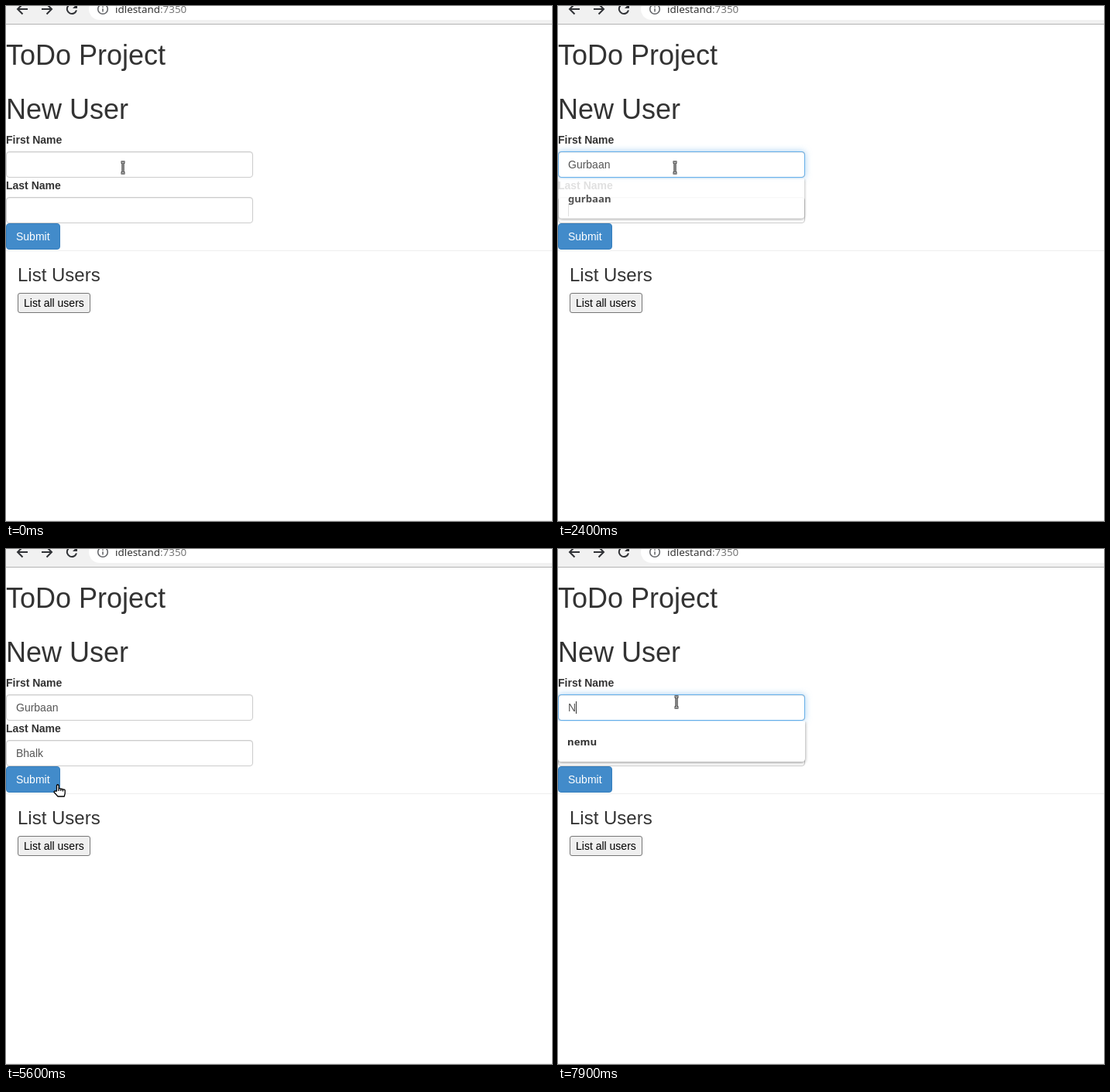
Animation of 705x666 px, one loop 8 s. Source, as an HTML page:

```html
<!DOCTYPE html>
<html lang="en">
<head>
<meta charset="utf-8">
<title>User form</title>
<style>
html, body { margin: 0; width: 100%; height: 100%; overflow: hidden; background: #fff; }
body { position: relative; font: 14px/20px "Liberation Sans", Arial, sans-serif; color: #333; }
body > * { position: absolute; box-sizing: border-box; white-space: pre; margin: 0; }
h1, h3 { font-weight: 500; line-height: 1.1; }
h1 { font-size: 36px; left: 0; }
h3 { font-size: 24px; left: 15px; top: 335px; }
label { left: 0; font-weight: bold; }
svg { left: 0; top: 0; overflow: visible; }
.bar { left: 0; top: 0; width: 100%; height: 24px; background: #f1f1f1; border-bottom: 1px solid #b4b4b4; overflow: hidden; }
.pill { position: absolute; left: 107px; right: -30px; top: -10px; height: 28px; border-radius: 14px; background: #fff; }
.url { left: 141px; top: -6px; font: 13.4px/20px "Noto Sans", "Open Sans", sans-serif; }
.url i { font-style: normal; color: #757575; }
.field { left: 0; width: 319px; height: 34px; padding: 6px 12px; border: 1px solid #ccc; border-radius: 4px; color: #555; background: #fff; }
.field::before { content: ""; position: absolute; inset: -1px; border: 1px solid #66afe9; border-radius: 4px;
  box-shadow: 0 0 8px rgba(102,175,233,.6); opacity: var(--glow); }
.field::after { content: ""; position: absolute; inset: 0; border-radius: 3px; box-shadow: inset 0 1px 1px rgba(0,0,0,.075); }
.caret { position: absolute; top: 8px; width: 1px; height: 16px; background: #333; }
#submit { left: 0; top: 281px; width: 70px; height: 34px; padding: 6px 12px; color: #fff; background: #428bca; border: 1px solid #357ebd; border-radius: 4px; }
#submit.dark { background: #3276b1; border-color: #285e8e; }
#submit.ring { box-shadow: inset 0 0 0 1px #fff, inset 0 0 0 3px #101010; }
.all { left: 15px; top: 371px; width: 94px; height: 26px; padding: 2px 7px; color: #000; background: #efefef; border: 1px solid #767676; border-radius: 3px; }
.rule { left: 0; width: 100%; height: 1px; background: #eee; }
#menu { left: 0; width: 319px; padding: 8px 12px; background: #fff; border-radius: 0 0 4px 4px; box-shadow: 0 1px 4px rgba(0,0,0,.45);
  clip-path: inset(0 -8px -8px -8px); font: 600 13.2px/36px "Noto Sans", "Open Sans", sans-serif; }
</style>
</head>
<body>
<div class="bar"><div class="pill"></div></div>
<svg width="140" height="24" fill="none" stroke="#303236" stroke-width="2">
  <path d="M28 4H15M21.5-2.5 15 4l6.5 6.5M46 4h13M52.500-2.500 59 4l-6.500 6.500"/>
  <path d="M89.500-.5A6.200 6.200 0 1 0 91 5.500"/>
  <path d="M92-3V3H86z" fill="#303236" stroke="none"/>
  <g stroke="#606266" stroke-width="1.500"><circle cx="125" cy="4" r="6.300"/><path d="M125 3.200V7.500M125 .4V1.900"/></g>
</svg>
<div class="url">idlestand<i>:7350</i></div>
<h1 style="top:44px">ToDo Project</h1>
<h1 style="top:113.600px">New User</h1>
<label style="top:163px">First Name</label>
<div class="field" style="top:188px"></div>
<label style="top:222px">Last Name</label>
<div class="field" style="top:247px"></div>
<div id="submit">Submit</div>
<div class="rule" style="top:316px"></div>
<h3>List Users</h3>
<div class="all">List all users</div>
<div class="rule" style="top:665px"></div>
<div id="menu"></div>
<svg id="cursor" width="1" height="1" stroke-linejoin="round"></svg>
<script>
const LOOP = 8000;
const FIRST = "Gurbaan", LAST = "Bhalk", OTHER = "nemu";
const first = FIRST.toLowerCase(), last = LAST.toLowerCase();

const CURSORS = {
  beam: '<g fill="none"><path d="M-2.5-7H2.500M0-7V7M-2.500 7H2.500" stroke="#000" stroke-width="3"/>' +
        '<path d="M-2.500-7H2.500M0-7V7M-2.500 7H2.500" stroke="#fff"/></g>',
  hand: '<path d="M4.500 9V1.700q1.300-1.900 2.600 0V6q1.500-1 2.700.5 1.500-.8 2.600.6 1.700-.5 2.800.9V12l-1 4H6L1 10.500q0-2 2-1.300zM7.100 6V9M9.800 6.500V9M12.400 7.100V9.500" fill="#fff" stroke="#000" stroke-width="1.300"/>',
  arrow: '<path d="M.5.5V15.500L4 12.200 6.500 18 9 17 6.500 11.300H11.500z" fill="#fff" stroke="#000"/>'
};

// Each step overrides part of the state before it:
// a, b = field texts; ga, gb = focus glow; caret = field index or -1; at = cursor
const steps = [
  [0, { a: "", b: "", ga: 0, gb: 0, caret: -1, menu: [], top: 223, fade: 1, button: "", at: ["beam", 151, 209] }],
  [300, { ga: .5, caret: 0 }],
  [400, { ga: 1, menu: [first, OTHER], fade: .5 }],
  [500, { fade: 1 }],
  [1000, { caret: -1 }],
  [1100, { a: 1, caret: 0, menu: [first] }],
  [1200, { a: 2 }],
  [1400, { a: 3 }],
  [1500, { a: 4 }],
  [1600, { a: 5 }],
  [1700, { a: 6 }],
  [1900, { a: 7 }],
  [2400, { caret: 1, fade: .85 }],
  [2900, { ga: .5, gb: .5, menu: [] }],
  [3000, { ga: 0, gb: 1 }],
  [3500, { b: 1, menu: [last], top: 282, fade: 1 }],
  [3700, { b: 2 }],
  [3800, { b: 3 }],
  [4000, { b: 5 }],
  [4600, { caret: -1, at: ["beam", 140, 218] }],
  [4700, { at: ["arrow", 123, 235] }],
  [4900, { at: ["beam", 160, 262] }],
  [5000, { at: ["arrow", 225, 345] }],
  [5100, { at: ["arrow", 246, 368] }],
  [5400, { menu: [], gb: .6 }],
  [5500, { gb: .2, at: ["arrow", 140, 340] }],
  [5600, { gb: 0, at: ["hand", 61, 304] }],
  [5800, { button: "dark", at: ["hand", 55, 300] }],
  [6000, { a: "", b: "", button: "dark ring" }],
  [6200, { at: ["arrow", 230, 289] }],
  [6500, { at: ["beam", 260, 262] }],
  [6600, { at: ["arrow", 205, 238] }],
  [6700, { at: ["beam", 164, 215] }],
  [6900, { at: ["beam", 153, 198] }],
  [7200, { ga: .5, caret: 0, button: "", menu: [FIRST, first, OTHER], top: 223, fade: .5 }],
  [7300, { ga: 1, fade: 1 }],
  [7600, { caret: -1 }],
  [7900, { a: "N", caret: 0, menu: [OTHER] }]
];

const fields = document.querySelectorAll(".field");
const submit = document.getElementById("submit");
const menu = document.getElementById("menu");
const cursor = document.getElementById("cursor");
const typed = (value, name) => typeof value === "number" ? name.slice(0, value) : value;

function drawField(i, text, glow, caret) {
  fields[i].style.setProperty("--glow", glow);
  fields[i].innerHTML = text + (caret === i ? '<span class="caret"></span>' : "");
}

function draw(s) {
  drawField(0, typed(s.a, FIRST), s.ga, s.caret);
  drawField(1, typed(s.b, LAST), s.gb, s.caret);
  submit.className = s.button;
  menu.hidden = !s.menu.length;
  menu.textContent = s.menu.join("\n");
  menu.style.top = s.top + "px";
  menu.style.opacity = s.fade;
  menu.style.transform = s.fade < 1 ? "scale(.994)" : "none";
  const [kind, x, y] = s.at;
  cursor.innerHTML = CURSORS[kind];
  cursor.style.transform = `translate(${x}px, ${y}px)`;
}

const start = performance.now();
let shown = -1;
function tick() {
  const t = (performance.now() - start) % LOOP;
  const past = steps.filter(([time]) => time <= t);
  if (past.length !== shown) {
    shown = past.length;
    draw(Object.assign({}, ...past.map(step => step[1])));
  }
  requestAnimationFrame(tick);
}
tick();
</script>
</body>
</html>
```
